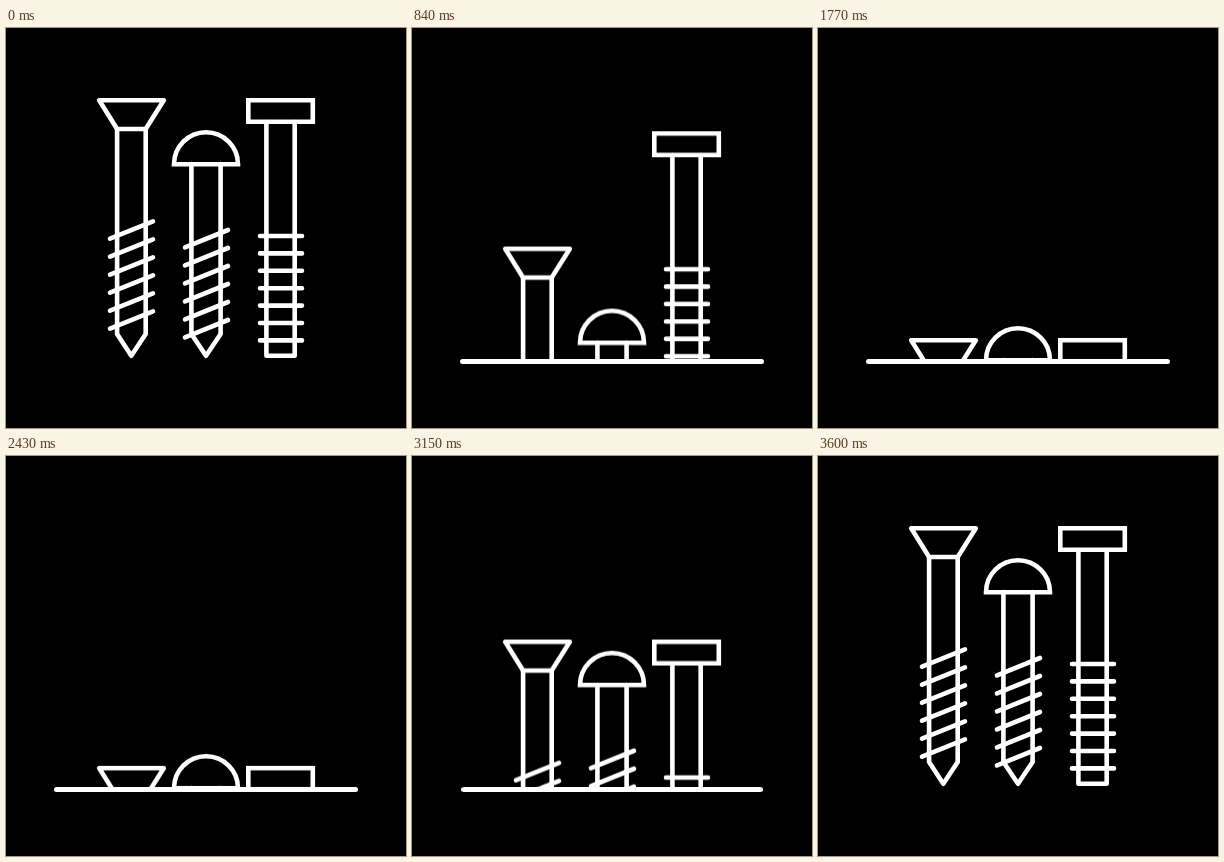
These frames come from a looping animation (400x400 px, 3.63 s). An HTML page:

```html
<!DOCTYPE html>
<html lang="en">
<head>
<meta charset="utf-8">
<title>Screws</title>
<style>
  html, body { margin: 0; width: 100%; height: 100%; overflow: hidden; background: #000; }
  svg { display: block; width: 100%; height: 100%; }
  path { fill: none; stroke: #fff; stroke-width: 4.6; stroke-linecap: round; stroke-linejoin: round; }
  .square { stroke-linejoin: miter; }
  .ground { stroke-width: 5; }
</style>
</head>
<body>
<svg viewBox="0 0 400 400">
  <clipPath id="above"><rect width="400" height="333"/></clipPath>
  <clipPath id="west"><rect width="200" height="400"/></clipPath>
  <clipPath id="east"><rect x="200" width="200" height="400"/></clipPath>
  <g clip-path="url(#above)">
    <g id="flat">
      <path d="M93.2 72.2H157.8L139.7 101H111.1Z"/>
      <path d="M111.1 101V306L125.3 327.8L139.7 306V101"/>
    </g>
    <g id="round">
      <path class="square" d="M168 136.3A32 32 0 0 1 232 136.3Z"/>
      <path d="M185.4 136V306L200 327.8L214.6 306V136"/>
    </g>
    <g id="bolt">
      <path class="square" d="M242.3 72.2H306.8V93.8H242.3Z"/>
      <path d="M260.4 94V327.8H288.7V94"/>
    </g>
  </g>
  <g clip-path="url(#west)"><path id="left" class="ground" d="M50.5 333.5H360"/></g>
  <g clip-path="url(#east)"><path id="right" class="ground" d="M349.5 333.5H40"/></g>
</svg>
<script>
  const LOOP = 3630, END = 3600;
  const IN = 'cubic-bezier(.35,0,.35,1)';
  const OUT = 'cubic-bezier(.65,0,.65,1)'; // IN played backwards
  const $ = id => document.getElementById(id);

  function addThreads(id, x1, y1, x2, y2, count, pitch) {
    const path = document.createElementNS('http://www.w3.org/2000/svg', 'path');
    let d = '';
    for (let i = 0; i < count; i++) {
      d += `M${x1} ${y1 + i * pitch}L${x2} ${y2 + i * pitch}`;
    }
    path.setAttribute('d', d);
    $(id).append(path);
  }

  // Ease from one state to another, hold, then ease back.
  function cycle(id, rest, active, start, reach, leave) {
    const key = (time, transform, easing = 'linear') =>
      ({ offset: time / LOOP, transform, easing });
    $(id).animate([
      key(0, rest),
      key(start, rest, IN),
      key(reach, active),
      key(leave, active, OUT),
      key(END, rest),
      key(LOOP, rest)
    ], { duration: LOOP, iterations: Infinity });
  }

  addThreads('flat', 104, 210.7, 147, 193.3, 6, 18);
  addThreads('round', 179, 219.3, 222, 202, 6, 18);
  addThreads('bolt', 254, 208, 296, 208, 7, 17.4);

  const screws = [
    ['round', 196, 0],
    ['flat', 240, 300],
    ['bolt', 240, 600]
  ];
  for (const [id, depth, start] of screws) {
    cycle(id, 'translateY(0px)', `translateY(${depth}px)`, start, start + 1200, 2400);
  }

  // The ground opens from the middle; each half hides behind the centre at rest.
  for (const [id, shift] of [['left', 153], ['right', -153]]) {
    cycle(id, `translateX(${shift}px)`, 'translateX(0px)', 0, 570, 3100);
  }
</script>
</body>
</html>
```
